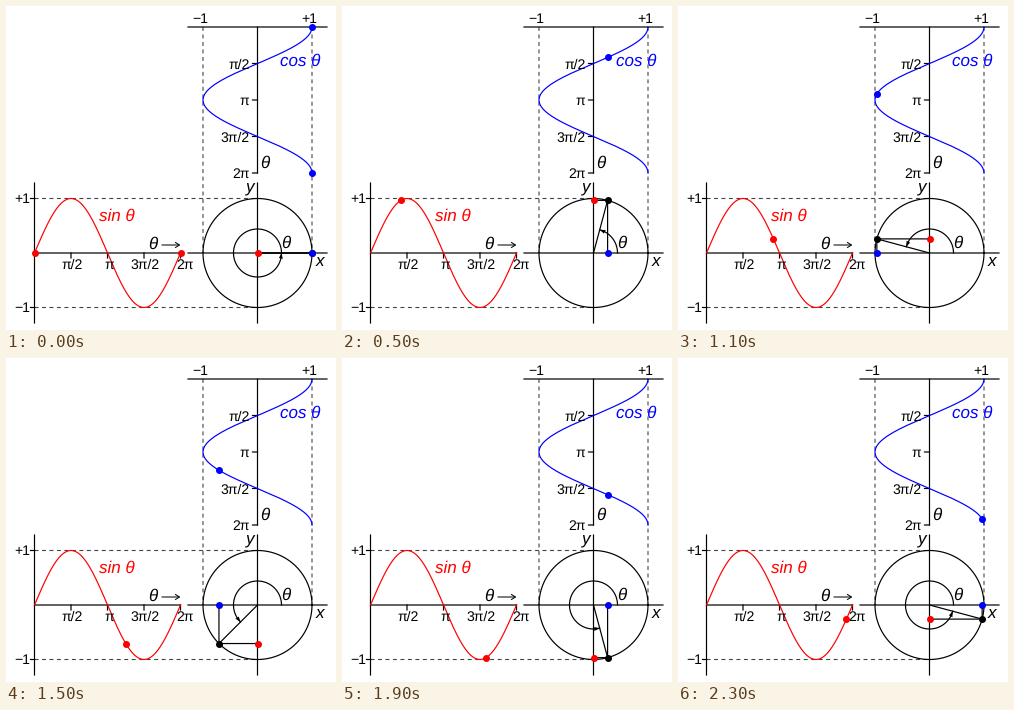
A matplotlib script that plays this animation: 330 by 324 pixels, repeating every 2.4 s.

```python
import numpy as np
import matplotlib.pyplot as plt
from matplotlib.animation import FuncAnimation

W, H, DPI = 330, 324, 100
PX = 72 / DPI                   # one pixel in points
FRAMES, STEP = 24, 100
CX, CY, R = 251.5, 247, 54.5    # unit circle
SX, TY, SPAN = 28.5, 21, 146    # sine origin x, cosine origin y, length of 2π
ARC = 24

plt.rcParams["font.family"] = "Liberation Sans"
plt.rcParams["text.hinting"] = "none"
plt.rcParams["text.hinting_factor"] = 1
fig = plt.figure(figsize=(W / DPI, H / DPI), dpi=DPI, facecolor="white")
ax = fig.add_axes([0, 0, 1, 1])
ax.set_xlim(0, W)
ax.set_ylim(H, 0)
ax.axis("off")


def line(xs, ys, color="black", width=1.2, **kw):
    return ax.plot(xs, ys, color=color, lw=width * PX, snap=False, **kw)[0]


def label(x, y, text, size=13.5, color="black", ha="left", style="normal"):
    ax.text(x, y, text, fontsize=size * PX, color=color, ha=ha,
            va="baseline", style=style, zorder=3)


def italic(x, y, text, color="black"):
    label(x, y, text, 17, color, style="italic")


def dots(color, z):
    return line([], [], color, 0, ls="", marker="o", ms=7 * PX, mew=0, zorder=z)


# guides
for sign in (-1, 1):
    dash = dict(color="#444444", width=1.1, dashes=(3.6, 3.2), zorder=1)
    line([SX, CX], [CY - sign * R] * 2, **dash)
    line([CX + sign * R] * 2, [TY, CY], **dash)

# axes
line([SX, SX], [177, 317])
line([SX, SX + SPAN], [CY, CY])
line([182, 321], [TY, TY])
line([CX, CX], [TY, TY + SPAN])
line([182, 321], [CY, CY])
line([CX, CX], [177, 317])

# ticks and their labels
for i, name in enumerate(("π/2", "π", "3π/2", "2π"), 1):
    d = SPAN * i / 4
    line([SX + d] * 2, [CY, CY + 5])
    line([CX - 5, CX], [TY + d] * 2)
    label(CX - 8, TY + d + 5, name, ha="right")
    if i < 4:
        label(SX + d + 1.5, 263, name, ha="center")
    else:
        label(170, 263, name)
for sign, name in ((1, "+1"), (-1, "−1")):
    line([SX - 4, SX], [CY - sign * R] * 2)
    label(24, CY - sign * R + 4.5, name, ha="right")
    label(CX + sign * R - 3, 17, name, ha="center")

# curves
t = np.linspace(0, 2 * np.pi, 241)
line(SX + SPAN * t / (2 * np.pi), CY - R * np.sin(t), "red")
line(CX + R * np.cos(t), TY + SPAN * t / (2 * np.pi), "blue")
line(CX + R * np.cos(t), CY - R * np.sin(t))

italic(93, 215, "sin θ", "red")
italic(274, 60, "cos θ", "blue")
italic(142, 243, "θ")
line([156, 173], [239, 239], width=1)
line([169.5, 173.5, 169.5], [236.5, 239, 241.5], width=1)
italic(254, 162, "θ")
italic(275, 242, "θ")
italic(240, 186, "y")
italic(310, 260, "x")

# moving parts
spoke = line([], [], zorder=4)
legs = line([], [], zorder=4)
arc = line([], [], zorder=4)
head = ax.fill([0, 0, 0], [0, 0, 0], color="black", lw=0, zorder=4)[0]
tip = dots("black", 5)
reds = dots("red", 6)
blues = dots("blue", 6)


def polar(r, a):
    return CX + r * np.cos(a), CY - r * np.sin(a)


def draw(k):
    a = 2 * np.pi * (k or FRAMES) / FRAMES
    x, y = polar(R, a)
    spoke.set_data([CX, x], [CY, y])
    legs.set_data([CX, x, x], [y, y, CY])
    arc.set_data(*polar(ARC, np.linspace(0, a, 90)))
    back = a - 5.5 / ARC
    head.set_xy([polar(ARC, a), polar(ARC + 2, back), polar(ARC - 2, back)])
    tip.set_data([x], [y])

    # both ends of each curve are marked at the start
    turns = [0, 1] if k == 0 else [k / FRAMES]
    along = [SPAN * u for u in turns]
    reds.set_data([CX] + [SX + s for s in along], [y] * (len(along) + 1))
    blues.set_data([x] * (len(along) + 1), [CY] + [TY + s for s in along])
    return spoke, legs, arc, head, tip, reds, blues


anim = FuncAnimation(fig, draw, frames=FRAMES, interval=STEP,
                     repeat=True, repeat_delay=0)
plt.show()
```
